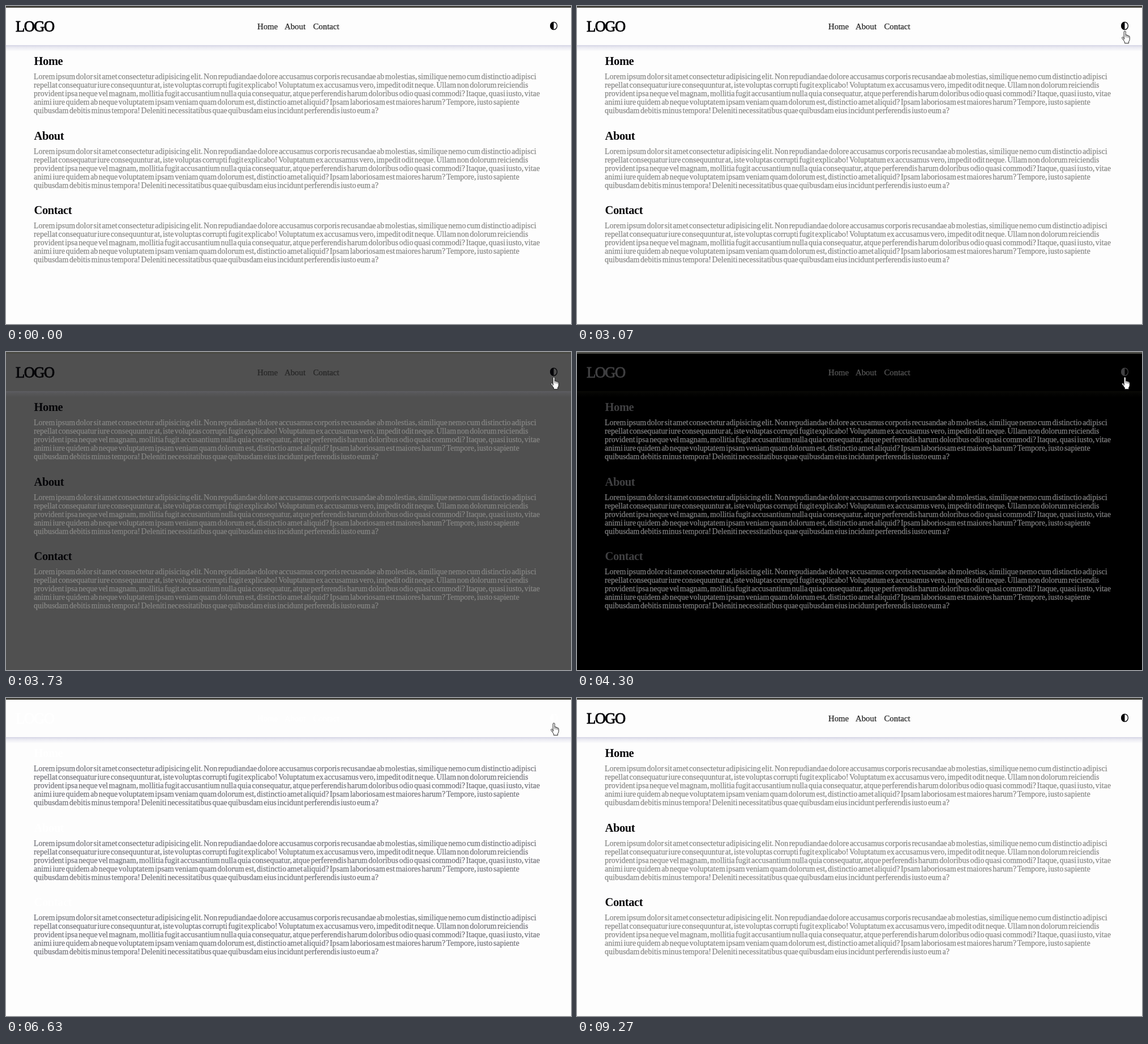
An HTML page that plays this animation: 998 by 561 pixels, repeating every 9340 ms.

```html
<!DOCTYPE html>
<html lang="en">
<head>
<meta charset="utf-8">
<title>Theme toggle</title>
<style>
  html, body { margin: 0; width: 100%; height: 100%; overflow: hidden; }
  svg { display: block; width: 100vw; height: 100vh; font-family: "Liberation Serif", "Times New Roman", serif; }
  text { stroke: currentColor; stroke-width: .25px; }
  .logo { font-size: 26.5px; letter-spacing: -1.5px; stroke-width: .9px; }
  .link { font-size: 14.8px; }
  .title { font-size: 20.5px; font-weight: bold; letter-spacing: -.4px; stroke-width: 0; }
  .copy { font-size: 14px; word-spacing: -2px; }
</style>
</head>
<body>
<svg id="stage" viewBox="0 0 998 561" xmlns="http://www.w3.org/2000/svg">
  <defs>
    <linearGradient id="fade" x2="0" y2="1">
      <stop class="shade" offset="0" stop-opacity=".85"/>
      <stop class="shade" offset=".35" stop-opacity=".4"/>
      <stop class="shade" offset="1" stop-opacity="0"/>
    </linearGradient>
  </defs>
  <rect id="page" width="998" height="561"/>
  <rect y="69" width="998" height="11" fill="url(#fade)"/>
  <rect id="bar" width="998" height="3"/>
  <g id="ink" fill="currentColor">
    <text class="logo" x="17" y="44.5">LOGO</text>
    <ellipse cx="967.5" cy="35" rx="5.9" ry="6.7" fill="none" stroke="currentColor" stroke-width="1.3"/>
    <path d="M967.5 27.8A6.4 7.2 0 0 0 967.5 42.2Z"/>
  </g>
  <g id="links" fill="currentColor"></g>
  <g id="copy" fill="currentColor"></g>
  <g id="cursor" transform="translate(-.8 -.3)" fill="#fff" stroke="#222" stroke-width="1" stroke-linejoin="round">
    <path d="M967 59V46.2Q967 44.5 968.5 44.5T970 46.2V51.5Q972.2 50.6 972.6 52.3Q974.6 51.5 975 53.2Q977 52.8 977 55V59.5Q976.8 61.5 975.4 63V66H968.3V63.6L963.6 57.2Q962.9 55.6 964.3 55.2Q965.7 55 967 57Z"/>
    <path d="M970 51V55.5M972.6 52V56M975 53V56.5" fill="none" stroke-width=".7"/>
  </g>
</svg>
<script>
const LOOP = 9340, FADE = 700;
const TO_DARK = 3450, TO_LIGHT = 5950, INK_DELAY = 730;
const CURSOR_IN = 2300, CURSOR_OUT = 8000;

const LINES = [
  "Lorem ipsum dolor sit amet consectetur adipisicing elit. Non repudiandae dolore accusamus corporis recusandae ab molestias, similique nemo cum distinctio adipisci",
  "repellat consequatur iure consequuntur at, iste voluptas corrupti fugit explicabo! Voluptatum ex accusamus vero, impedit odit neque. Ullam non dolorum reiciendis",
  "provident ipsa neque vel magnam, mollitia fugit accusantium nulla quia consequatur, atque perferendis harum doloribus odio quasi commodi? Itaque, quasi iusto, vitae",
  "animi iure quidem ab neque voluptatem ipsam veniam quam dolorum est, distinctio amet aliquid? Ipsam laboriosam est maiores harum? Tempore, iusto sapiente",
  "quibusdam debitis minus tempora! Deleniti necessitatibus quae quibusdam eius incidunt perferendis iusto eum a?"
];

const byId = id => document.getElementById(id);
const page = byId("page"), bar = byId("bar"), ink = byId("ink");
const links = byId("links"), copy = byId("copy"), cursor = byId("cursor");
const shades = document.querySelectorAll(".shade");

function addText(parent, cls, x, y, content) {
  const node = document.createElementNS("http://www.w3.org/2000/svg", "text");
  node.setAttribute("class", cls);
  node.setAttribute("x", x);
  node.setAttribute("y", y);
  node.textContent = content;
  parent.append(node);
}

["Home", "About", "Contact"].forEach((name, i) => {
  const top = i * 131.5;
  addText(links, "link", [444, 492, 542.5][i], 41, name);
  addText(ink, "title", 49.5, 104 + top, name);
  LINES.forEach((line, n) => addText(copy, "copy", 49, 129.3 + top + n * 14.95, line));
});

// CSS "ease": cubic-bezier(.25, .1, .25, 1)
function ease(x) {
  if (x <= 0) return 0;
  if (x >= 1) return 1;
  const curve = (s, a, b) => 3 * a * s * (1 - s) ** 2 + 3 * b * s * s * (1 - s) + s ** 3;
  let low = 0, high = 1;
  for (let i = 0; i < 20; i++) {
    const mid = (low + high) / 2;
    if (curve(mid, .25, .25) < x) low = mid; else high = mid;
  }
  return curve(low, .1, 1);
}

const darkness = t => ease((t - TO_DARK) / FADE) - ease((t - TO_LIGHT) / FADE);

const mix = (from, to, k) =>
  `rgb(${from.map((v, i) => Math.round(v + (to[i] - v) * k)).join(",")})`;

function paint(t) {
  const back = darkness(t), front = darkness(t - INK_DELAY);
  const shade = mix([205, 205, 224], [12, 12, 8], back ** 1.5);
  page.setAttribute("fill", mix([253, 253, 253], [0, 0, 0], back));
  bar.setAttribute("fill", mix([66, 65, 58], [78, 78, 72], back));
  shades.forEach(s => s.setAttribute("stop-color", shade));
  ink.style.color = mix([5, 5, 8], [255, 255, 255], front);
  links.style.color = mix([38, 38, 38], [255, 255, 255], front);
  copy.style.color = mix([136, 136, 134], [116, 116, 124], front);
  cursor.setAttribute("visibility", t >= CURSOR_IN && t < CURSOR_OUT ? "visible" : "hidden");
}

const start = performance.now();
function tick() {
  paint((performance.now() - start) % LOOP);
  requestAnimationFrame(tick);
}
tick();
</script>
</body>
</html>
```
